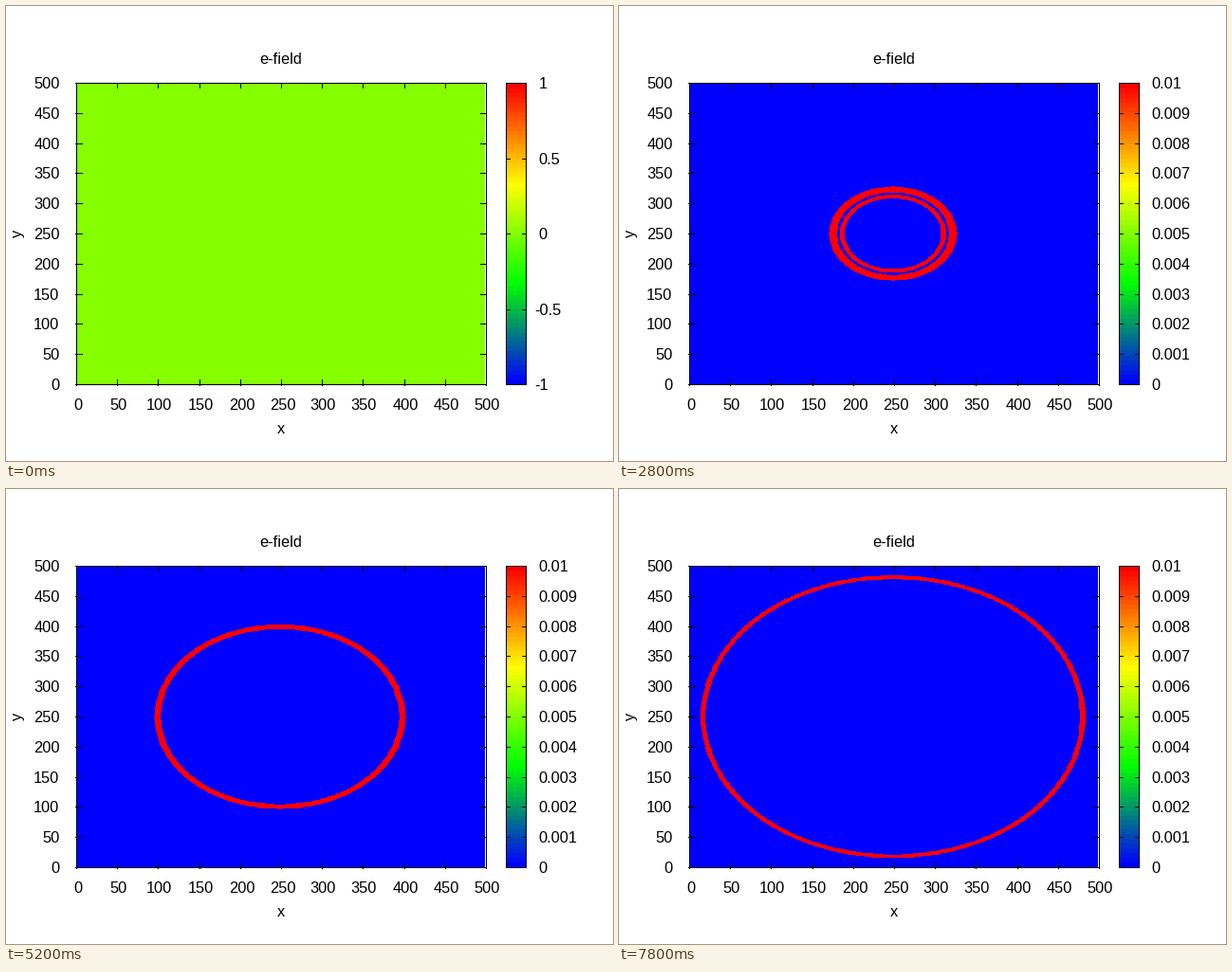
Animation of 640x480 px, one loop 8 s. Source, as a matplotlib script:

```python
import math

import matplotlib.pyplot as plt
import numpy as np
from matplotlib.animation import FuncAnimation
from matplotlib.collections import LineCollection

W, H, DPI = 640, 480, 100
FRAMES, STEPS = 40, 10
SIZE, MID = 501, 250
COURANT = 0.9 / math.sqrt(2)
SHADES = 64

# plot frame and colour bar, in pixel centres
LEFT, RIGHT, TOP, BOTTOM = 74.5, 506.5, 81.5, 399.5
BAR_L, BAR_R = 527.5, 548.5
SX, SY = (RIGHT - LEFT) / 500, (BOTTOM - TOP) / 500

plt.rcParams["font.family"] = "Liberation Sans"
FONT = 16.4 * 72 / DPI
LINE = 72 / DPI


def palette(v):
    """Blue, green, yellow, red in a fixed number of shades."""
    v = np.minimum(np.floor(v * SHADES), SHADES - 1) / (SHADES - 1)
    stops = [0, 1 / 3, 2 / 3, 1]
    red = np.interp(v, stops, [0, 0, 1, 1])
    green = np.interp(v, stops, [0, 1, 1, 0])
    blue = np.interp(v, stops, [1, 0, 0, 0])
    return np.stack([red, green, blue], axis=-1)


def pulse(q):
    return math.exp(-((q - 30) ** 2) / 100)


def simulate():
    """Spreading pulse on a square grid, as field strength in hundredths."""
    cols = np.floor((np.arange(75, 505) + 0.5 - 288.9) / SX + MID + 0.5)
    rows = np.floor((np.arange(82, 399) + 0.5 - 240.2) / SY + MID + 0.5)
    pick = np.ix_(rows.astype(int), cols.astype(int))
    old = np.zeros((SIZE, SIZE))
    now = np.zeros((SIZE, SIZE))
    now[MID, MID] = pulse(0)
    shots = []
    for q in range((FRAMES - 1) * STEPS + 1):
        if q % STEPS == 0:
            level = np.rint(np.abs(now) * 100).astype(np.uint8)
            shots.append((level[pick], int(level.max())))
        inner = now[1:-1, 1:-1]
        lap = (now[2:, 1:-1] + now[:-2, 1:-1] + now[1:-1, 2:]
               + now[1:-1, :-2] - 4 * inner)
        new = np.zeros_like(now)
        new[1:-1, 1:-1] = (2 * inner - old[1:-1, 1:-1]
                           + COURANT ** 2 * lap)
        new[MID, MID] += pulse(q + 1) - pulse(q)
        old, now = now, new
    return shots


def tick_step(span):
    power = 10 ** math.floor(math.log10(span))
    room = 20 / (span / power)
    for limit, step in ((40, 0.05), (20, 0.1), (10, 0.2), (4, 0.5), (2, 1)):
        if room > limit:
            return step * power
    return 2 * power


fig = plt.figure(figsize=(W / DPI, H / DPI), dpi=DPI, facecolor="white")
ax = fig.add_axes([0, 0, 1, 1])


def label(x, y, s, ha="center", **kw):
    kw.setdefault("va", "baseline")
    return ax.text(x, y, s, ha=ha, fontsize=FONT, color="black", **kw)


def strokes(segments):
    # coordinates already sit on pixel centres, so no snapping
    lines = LineCollection(segments, colors="black", linewidths=LINE,
                           antialiaseds=False, capstyle="projecting",
                           snap=False, zorder=3)
    ax.add_collection(lines, autolim=False)
    return lines


def box(x0, y0, x1, y1):
    return [[(x0, y0), (x1, y0)], [(x0, y1), (x1, y1)],
            [(x0, y0), (x0, y1)], [(x1, y0), (x1, y1)]]


shots = simulate()
field = ax.imshow(np.zeros((317, 430, 3)), extent=(75, 505, 399, 82),
                  interpolation="nearest", aspect="auto")
bar = palette((np.arange(317)[::-1] + 0.5) / 317)[:, None, :]
ax.imshow(bar, extent=(528, 548, 399, 82),
          interpolation="nearest", aspect="auto")
ax.set_xlim(0, W)
ax.set_ylim(H, 0)
ax.axis("off")

ticks = []
for v in range(0, 501, 50):
    x = math.floor(LEFT + v * SX) + 0.5
    y = math.floor(BOTTOM - v * SY) + 0.5
    ticks += [[(x, TOP), (x, TOP + 5)], [(x, BOTTOM - 5), (x, BOTTOM + 1)],
              [(LEFT - 1, y), (LEFT + 6, y)], [(RIGHT - 6, y), (RIGHT, y)]]
    label(x + 1, 425.5, str(v))
    label(56.5, y + 5.5, str(v), ha="right")
strokes(box(LEFT, TOP, RIGHT, BOTTOM) + box(BAR_L, TOP, BAR_R, BOTTOM))
strokes(ticks)
label(290, 61, "e-field")
label(290, 451, "x")
label(13, 240, "y", rotation=90, va="center")

bar_ticks = strokes([])
bar_labels = []


def draw(n):
    level, top = shots[n]
    lo, hi = (0, top / 100) if top else (-1, 1)
    span = hi - lo
    field.set_data(palette((level / 100 - lo) / span))

    while bar_labels:
        bar_labels.pop().remove()
    step = tick_step(span * (1 - 1e-6) if top else span)
    step = float(f"{step:.3g}")
    marks = []
    for i in range(math.floor(span / step + 1e-6) + 1):
        v = lo + i * step
        y = math.floor(BOTTOM - (v - lo) / span * (BOTTOM - TOP)) + 0.5
        marks += [[(BAR_L, y), (BAR_L + 4, y)], [(BAR_R - 4, y), (BAR_R, y)]]
        x = 557.5 if v < 0 else 561.5
        bar_labels.append(label(x, y + 5.5, f"{v:.4g}", ha="left"))
    bar_ticks.set_segments(marks)
    return [field, bar_ticks, *bar_labels]


anim = FuncAnimation(fig, draw, frames=FRAMES, interval=200, repeat=True,
                     repeat_delay=0, blit=False)
plt.show()
```
